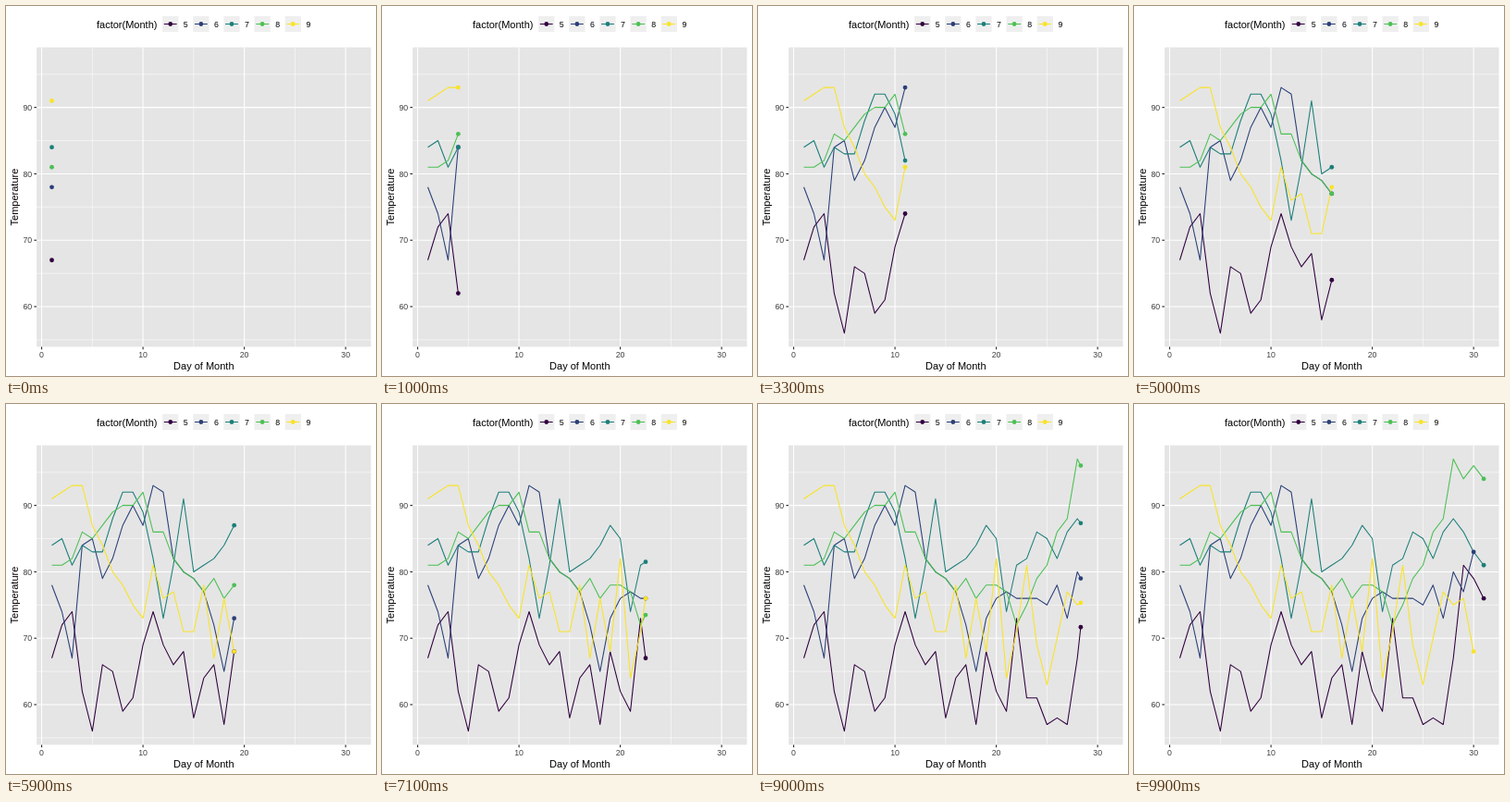
Animation, 400 px wide and 400 px high, one loop 10000 ms. Source, as an HTML page:

```html
<!DOCTYPE html>
<html lang="en">
<head>
<meta charset="utf-8">
<title>Temperature by day of month</title>
<style>
  html, body { margin: 0; width: 100%; height: 100%; overflow: hidden; background: #fff; }
  svg { display: block; width: 100vw; height: 100vh; }
  text { font-family: "Liberation Sans", Arial, sans-serif; font-size: 11px; fill: #000; }
  .small { font-size: 8.8px; }
  .axis { fill: #404040; }
</style>
</head>
<body>
<svg id="chart" viewBox="0 0 400 400"></svg>
<script>
const FRAMES = 100, FRAME_MS = 100, DAYS = 31;
const panel = { left: 33.1, right: 394.52, top: 44.7, bottom: 368.4 };
const svg = document.getElementById("chart");

const parse = text => text.split(" ").map(Number);
const may = parse("67 72 74 62 56 66 65 59 61 69 74 69 66 68 58 64 66 57 68 62 59 73 61 61 57 58 57 67 81 79 76");
const june = parse("78 74 67 84 85 79 82 87 90 87 93 92 82 80 79 77 72 65 73 76 77 76 76 76 75 78 73 80 77 83");
const july = parse("84 85 81 84 83 83 88 92 92 89 82 73 81 91 80 81 82 84 87 85 74 81 82 86 85 82 86 88 86 83 81");
const august = parse("81 81 82 86 85 87 89 90 90 92 86 86 82 80 79 77 79 76 78 78 77 72 75 79 81 86 88 97 94 96 94");
const september = parse("91 92 93 93 87 84 80 78 75 73 81 76 77 71 71 78 67 76 68 82 64 71 81 69 63 70 77 75 76 68");

const series = [
  { label: "5", color: "#31003f", temps: may },
  { label: "6", color: "#2a3f79", temps: june },
  { label: "7", color: "#1c7f7a", temps: july },
  { label: "8", color: "#4bc054", temps: august },
  { label: "9", color: "#f9e327", temps: september }
];

const xOf = day => panel.left + (day + 0.5) / 33 * (panel.right - panel.left);
const yOf = temp => panel.bottom - (temp - 53.95) / 45.1 * (panel.bottom - panel.top);

function add(tag, attrs, text) {
  const node = document.createElementNS("http://www.w3.org/2000/svg", tag);
  for (const name in attrs) node.setAttribute(name, attrs[name]);
  if (text) node.textContent = text;
  svg.appendChild(node);
  return node;
}
const line = (x1, y1, x2, y2, stroke, width = 1.07) =>
  add("line", { x1, y1, x2, y2, stroke, "stroke-width": width });
const rect = (x, y, width, height, fill) => add("rect", { x, y, width, height, fill });
const dot = (cx, cy, fill) => add("circle", { cx, cy, r: 2.4, fill });

function drawAxes() {
  rect(panel.left, panel.top, panel.right - panel.left, panel.bottom - panel.top, "#e5e5e5");
  const column = (day, width) => line(xOf(day), panel.top, xOf(day), panel.bottom, "#fff", width);
  const row = (temp, width) => line(panel.left, yOf(temp), panel.right, yOf(temp), "#fff", width);
  [55, 65, 75, 85, 95].forEach(temp => row(temp, 0.53));
  [5, 15, 25].forEach(day => column(day, 0.53));
  [60, 70, 80, 90].forEach(temp => {
    const y = yOf(temp);
    row(temp);
    line(panel.left - 2.74, y, panel.left, y, "#222");
    add("text", { x: 28.2, y: y + 3.2, class: "small axis", "text-anchor": "end" }, temp + "");
  });
  [0, 10, 20, 30].forEach(day => {
    const x = xOf(day);
    column(day);
    line(x, panel.bottom, x, panel.bottom + 2.74, "#222");
    add("text", { x, y: 379.7, class: "small axis", "text-anchor": "middle" }, day + "");
  });
  add("text", { x: 213.8, y: 392.8, "text-anchor": "middle" }, "Day of Month");
  add("text", { transform: "translate(13.4 206.6) rotate(-90)", "text-anchor": "middle" }, "Temperature");
}

function drawLegend() {
  const size = 17.28, y = 19.5;
  add("text", { x: 98, y: 23.6 }, "factor(Month)");
  series.forEach(({ label, color }, i) => {
    const x = 169.1 + i * 33.13;
    rect(x, y - size / 2, size, size, "#efefef");
    line(x + size * 0.1, y, x + size * 0.9, y, color);
    dot(x + size / 2, y, color);
    add("text", { x: x + size + 5.48, y: y + 3.2, class: "small" }, label);
  });
}

drawAxes();
drawLegend();
for (const s of series) {
  s.path = add("polyline", { fill: "none", stroke: s.color, "stroke-width": 1.07, "stroke-linejoin": "round" });
}
for (const s of series) s.head = dot(0, 0, s.color);

// Each day lands on a whole frame; halves round to the even one.
function frameOfDay(day) {
  const tenths = (day - 1) * 33;
  const whole = Math.floor(tenths / 10);
  const rest = tenths % 10;
  return whole + (rest > 5 || (rest === 5 && whole % 2 === 1) ? 1 : 0);
}

function dayAt(frame) {
  let day = 1;
  while (day < DAYS && frameOfDay(day + 1) <= frame) day++;
  if (day === DAYS) return day;
  const start = frameOfDay(day);
  return day + (frame - start) / (frameOfDay(day + 1) - start);
}

function render(ms) {
  const frame = Math.floor(ms / FRAME_MS) % FRAMES;
  const now = dayAt(frame);
  for (const { temps, path, head } of series) {
    const day = Math.min(now, temps.length);
    const whole = Math.floor(day);
    const from = temps[whole - 1];
    const to = temps[whole] ?? from;
    const x = xOf(day), y = yOf(from + (to - from) * (day - whole));
    const points = temps.slice(0, whole).map((temp, i) => [xOf(i + 1), yOf(temp)]);
    if (day > whole) points.push([x, y]);
    path.setAttribute("points", points.join(" "));
    head.setAttribute("cx", x);
    head.setAttribute("cy", y);
  }
}

const began = performance.now();
function tick() {
  render(performance.now() - began);
  requestAnimationFrame(tick);
}
tick();
</script>
</body>
</html>
```
